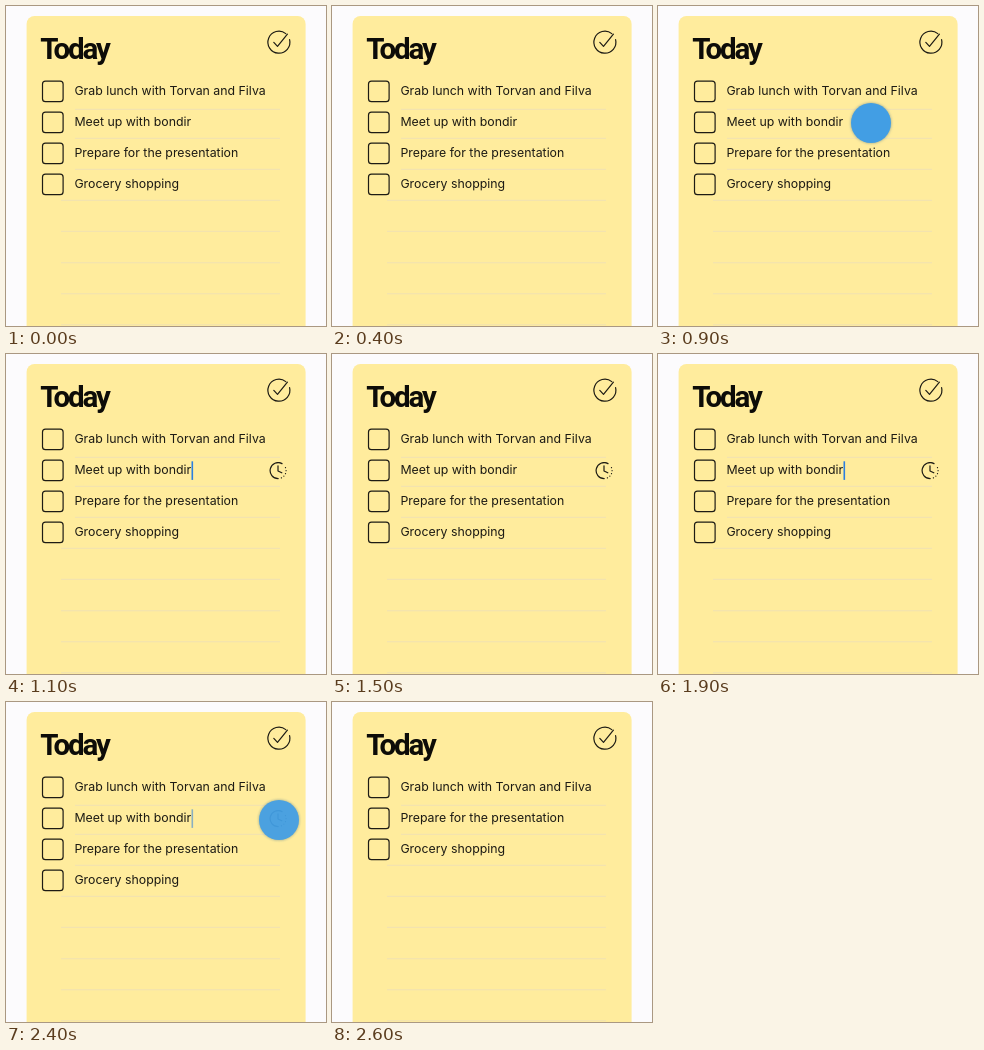
These frames come from a looping animation (320 px wide and 320 px high, 2700 ms). An HTML page:

```html
<!DOCTYPE html>
<html lang="en">
<head>
<meta charset="utf-8">
<title>Today</title>
<style>
  html, body { margin: 0; width: 100%; height: 100%; overflow: hidden; background: #fcfbfd; }
  svg { display: block; width: 320px; height: 320px; }
  .title { font: 700 29.5px Roboto, sans-serif; letter-spacing: -2.1px; fill: #0d0c08; }
  .item { font: 400 12.35px Inter, sans-serif; fill: #1d1b14; }
  .ink { fill: none; stroke: #1d1b14; stroke-width: 1.2; stroke-linecap: round; stroke-linejoin: round; }
  .rule { stroke: #f0e2b3; stroke-width: 1; }
  .caret { fill: #2b7fe0; }
  .tap { fill: #429ee4; filter: drop-shadow(0 0 1.5px rgba(50, 100, 140, .55)); }

  /* One 2.7 s loop in hard 100 ms steps */
  .removed, .shifted, .stub, .caret, .snooze, .tap { animation: 2.7s step-end infinite; }
  .removed { animation-name: remove; }
  .shifted { animation-name: shift; }
  .stub { animation-name: stub; }
  .caret { animation-name: blink; }
  .snooze { animation-name: snooze; }
  .first { animation-name: tap-row; }
  .second { animation-name: tap-snooze; }

  @keyframes remove {
    0% { opacity: 1; }
    92.59% { opacity: .3; }
    96.29%, 100% { opacity: 0; }
  }
  @keyframes shift {
    0% { transform: none; }
    92.59% { transform: translateY(-16px); }
    96.29%, 100% { transform: translateY(-31px); }
  }
  @keyframes stub {
    0% { opacity: 0; }
    96.29%, 100% { opacity: 1; }
  }
  @keyframes blink {
    0% { opacity: 0; }
    37.03% { opacity: 1; }
    51.85% { opacity: .5; }
    55.55% { opacity: 0; }
    62.96% { opacity: .5; }
    66.66% { opacity: 1; }
    88.88% { opacity: .55; }
    92.59%, 100% { opacity: 0; }
  }
  @keyframes snooze {
    0% { opacity: 0; }
    37.03% { opacity: 1; }
    92.59%, 100% { opacity: 0; }
  }
  @keyframes tap-row {
    0% { opacity: 0; }
    25.92% { opacity: .5; }
    29.62% { opacity: 1; }
    37.03% { opacity: .4; }
    40.74%, 100% { opacity: 0; }
  }
  @keyframes tap-snooze {
    0% { opacity: 0; }
    85.18% { opacity: .5; }
    88.88% { opacity: .95; }
    92.59% { opacity: .5; }
    96.29%, 100% { opacity: 0; }
  }
</style>
</head>
<body>
<svg viewBox="0 0 320 320">
  <defs>
    <rect id="box" class="ink" x="36.5" y="75.1" width="20.6" height="20.6" rx="3"/>
  </defs>

  <rect x="20.6" y="10" width="279" height="330" rx="8" fill="#ffec9d"/>
  <text class="title" x="34.3" y="53.3">Today</text>

  <g class="ink" stroke-width="1.3">
    <path d="M279.8 27.6A11 11 0 1 0 283.6 33.6"/>
    <path d="M267.8 36.4L271.5 40.4L281.4 28.2"/>
  </g>

  <g class="rule">
    <path d="M69 103.3H274M69 132.3H274M69 163.3H274M55 194.3H274"/>
    <path d="M55 225.3H274M55 256.8H274M55 287.8H274M55 318.8H274"/>
    <path class="stub" d="M55 163.3H69"/>
  </g>

  <g>
    <use href="#box"/>
    <text class="item" x="68.4" y="89.3">Grab lunch with Torvan and Filva</text>
  </g>
  <g class="removed">
    <use href="#box" y="31"/>
    <text class="item" x="68.4" y="120.3">Meet up with bondir</text>
  </g>
  <g class="shifted">
    <use href="#box" y="62"/>
    <text class="item" x="68.4" y="151.3">Prepare for the presentation</text>
    <use href="#box" y="93"/>
    <text class="item" x="68.4" y="182.3">Grocery shopping</text>
  </g>

  <rect class="caret" x="185.5" y="107.3" width="1.6" height="18.6"/>
  <g class="ink snooze">
    <path d="M276 109.6A8 8 0 1 0 272.2 124.6"/>
    <path d="M275.4 123.9A8 8 0 0 0 278.6 112" stroke-dasharray=".1 2.9"/>
    <path d="M272 111.8V117L275.8 118.8"/>
  </g>

  <circle class="tap first" cx="213" cy="117" r="20"/>
  <circle class="tap second" cx="273" cy="118" r="20"/>
</svg>
</body>
</html>
```
